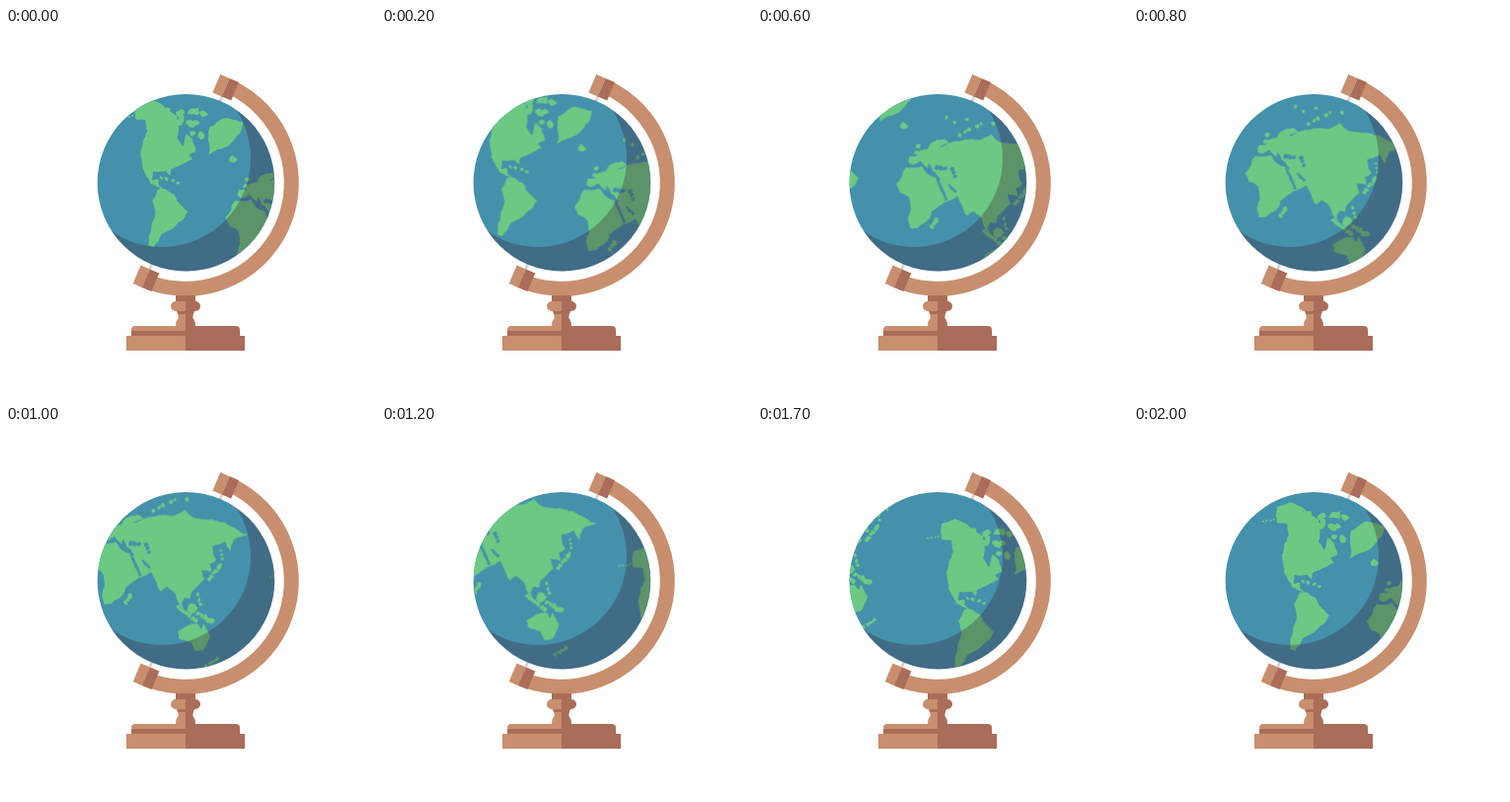
Write an HTML page that moves like this. It is 375x375 px and loops after 2100 ms.

```html
<!DOCTYPE html>
<html lang="en">
<head>
<meta charset="utf-8">
<title>Spinning desk globe</title>
<style>
  html, body { margin: 0; width: 100%; height: 100%; overflow: hidden; background: #fff; }
  svg { display: block; width: 100vw; height: 100vh; }
  .land { fill: #6bc983; }
  .sea { fill: #4491ab; }
  .light { fill: #c78f6e; }
  .dark { fill: #aa6d59; }
</style>
</head>
<body>
<svg viewBox="0 0 375 375">
  <defs>
    <clipPath id="ball"><circle cx="182.4" cy="156.8" r="89.8"/></clipPath>
    <path id="half" d="M182 271H172V277A5 5 0 0 0 172 287H173Q175 292 174.500 294Q172 297 172 302H131Q127 302 127 306V312H122V327H182Z"/>
    <g id="cap">
      <path class="light" d="M-10.200-10H0V10H-10.200Z"/>
      <path class="dark" d="M0-10H10.200V10H0Z"/>
    </g>
  </defs>

  <!-- axis pin, half-ring arm and its caps -->
  <path d="M222 62L142.500 252" stroke="#d8d5cf" stroke-width="3"/>
  <circle cx="182" cy="157" r="107.3" fill="none" stroke="#c78f6e" stroke-width="15"
          pathLength="360" stroke-dasharray="180 180" transform="rotate(-65 182 157)"/>
  <use href="#cap" transform="translate(222.700 60.300) rotate(23)"/>
  <use href="#cap" transform="translate(142 253.700) rotate(23)"/>

  <!-- foot: a lit half, its shaded mirror image, and shadow bands -->
  <use href="#half" class="light"/>
  <use href="#half" class="dark" transform="translate(364) scale(-1 1)"/>
  <path class="dark" d="M172 271H182V277H172ZM173 287H182V290H174.500ZM127 307H182V312H127Z"/>

  <!-- globe -->
  <circle class="sea" cx="182.4" cy="156.8" r="89.8"/>
  <g clip-path="url(#ball)">
    <g id="map"></g>
    <path d="M60 30H300V260H60ZM68 132a90 90 0 1 0 180 0a90 90 0 1 0-180 0Z"
          fill="rgb(60,26,48)" fill-opacity=".3" fill-rule="evenodd"/>
  </g>
</svg>
<script>
const NS = 'http://www.w3.org/2000/svg';
const STEPS = 21, STEP_MS = 100;
const DX = 13.7, DY = 5.65; // drift per step along the tilted equator

let seed = 7;
const random = () => (seed = seed * 16807 % 2147483647) / 2147483647;
const jitter = amp => (random() - .5) * amp;

const toPath = points =>
  'M' + points.map(p => p.map(v => v.toFixed(1)).join(' ')).join('L') + 'Z';

// Split an edge at displaced midpoints until the pieces are short.
function ragged(a, b) {
  const length = Math.hypot(b[0] - a[0], b[1] - a[1]);
  if (length < 3) return [a];
  const mid = a.map((v, i) => (v + b[i]) / 2 + jitter(length * .16));
  return [...ragged(a, mid), ...ragged(mid, b)];
}

// A ragged coast through a few key points.
function coast(text) {
  const keys = text.match(/\d+ \d+/g).map(pair => pair.split(' ').map(Number));
  return toPath(keys.flatMap((p, i) => ragged(p, keys[(i + 1) % keys.length])));
}

// Irregular blobs strung along a line: islands on the sea, or seas on the land.
function chain(x0, y0, x1, y1, count, size, spread = 0) {
  let d = '';
  for (let i = 0; i < count; i++) {
    const t = count > 1 ? i / (count - 1) : 0;
    const x = x0 + (x1 - x0) * t + jitter(2 * spread);
    const y = y0 + (y1 - y0) * t + jitter(2 * spread);
    d += toPath(Array.from({ length: 7 }, (_, k) => {
      const r = size * (.65 + random() * .7), angle = k * Math.PI * 2 / 7;
      return [x + r * Math.cos(angle), y + r * Math.sin(angle)];
    }));
  }
  return d;
}

function add(parent, tag, attrs) {
  const el = parent.appendChild(document.createElementNS(NS, tag));
  for (const key in attrs) el.setAttribute(key, attrs[key]);
  return el;
}

const shift = k => `translate(${k * DX} ${k * DY})`;
const map = document.getElementById('map');
const world = add(map, 'g', { id: 'world' });

// Each region is laid out as it appears at one step of the turn.
function region(step, ...layers) {
  const g = add(world, 'g', { transform: shift(step) });
  for (const [kind, d] of layers) add(g, 'path', { class: kind, d });
}
const land = (...keys) => ['land', keys.map(coast).join('')];
const isles = (...args) => ['land', chain(...args)];
const sea = (...args) => ['sea', chain(...args)];

// The Americas and Greenland
region(20,
  land(
    '145 82 158 77 170 82 187 95 187 117 193 126 196 113 203 119 206 131 199 134 203 139 190 145 181 149 180 155 176 151 163 151 162 160 168 159 168 164 174 170 160 163 152 148 150 130 157 110 155 99 145 98',
    '168 169 176 169 184 174 187 181 198 192 194 199 188 203 179 211 171 215 163 228 158 226 161 208 165 194 162 181',
    '219 134 219 116 220 106 234 97 254 101 251 112 240 124 228 129'),
  isles(185, 94, 211, 116, 16, 3, 8),
  isles(202, 90, 212, 92, 3, 4, 2),
  isles(171, 157, 188, 163, 4, 1.8, 1),
  isles(131, 97, 146, 94, 5, 1.2, .5),
  isles(244, 139, 244, 139, 1, 3.5));

// Africa
region(6,
  land('150 141 166 140 172 148 182 152 191 171 196 174 186 179 176 186 174 193 168 198 161 203 154 203 152 194 155 184 153 172 144 167 140 158'),
  isles(181, 195, 176, 202, 3, 2.4));

// Europe, Asia and Australia
region(10,
  land(
    '98 114 99 107 106 107 109 102 115 100 124 102 130 98 139 94 150 92 160 90 170 91 181 85 190 93 222 98 245 110 232 114 227 127 222 117 209 122 213 136 206 140 208 148 198 146 201 156 188 168 187 175 181 174 178 180 181 188 174 178 169 167 163 163 157 168 150 154 147 148 136 154 128 136 130 130 126 125 122 122 118 114 117 120 110 112 102 116',
    '117 100 119 96 126 91 134 90 139 94 130 97 124 103',
    '174 208 187 201 194 200 198 206 200 200 207 213 200 227 192 228 188 219 175 215'),
  isles(108, 97, 106, 104, 2, 2.8, .5),
  isles(150, 86, 160, 81, 3, 2.2, 1),
  isles(138, 70, 182, 77, 6, 2, 3),
  isles(218, 126, 219, 135, 3, 1.6),
  isles(217, 141, 206, 155, 6, 2.2, .5),
  isles(194, 171, 197, 181, 3, 1.8, 1),
  isles(174, 183, 192, 197, 7, 2.2, .5),
  isles(188, 185, 188, 185, 1, 5),
  isles(195, 189, 209, 199, 5, 2.6, 1),
  isles(214, 236, 203, 243, 4, 2, .5),
  sea(127, 119, 134, 120, 3, 2.6),
  sea(142, 120, 145, 128, 3, 2.2),
  sea(127, 131, 136, 151, 10, 1.6),
  sea(139, 137, 145, 143, 4, 1.6));

for (const turn of [-STEPS, STEPS]) {
  add(map, 'use', { href: '#world', transform: shift(turn) });
}

map.animate(
  [{ transform: 'translate(0px, 0px)' },
   { transform: `translate(${-STEPS * DX}px, ${-STEPS * DY}px)` }],
  { duration: STEPS * STEP_MS, easing: `steps(${STEPS})`, iterations: Infinity }
);
</script>
</body>
</html>
```
